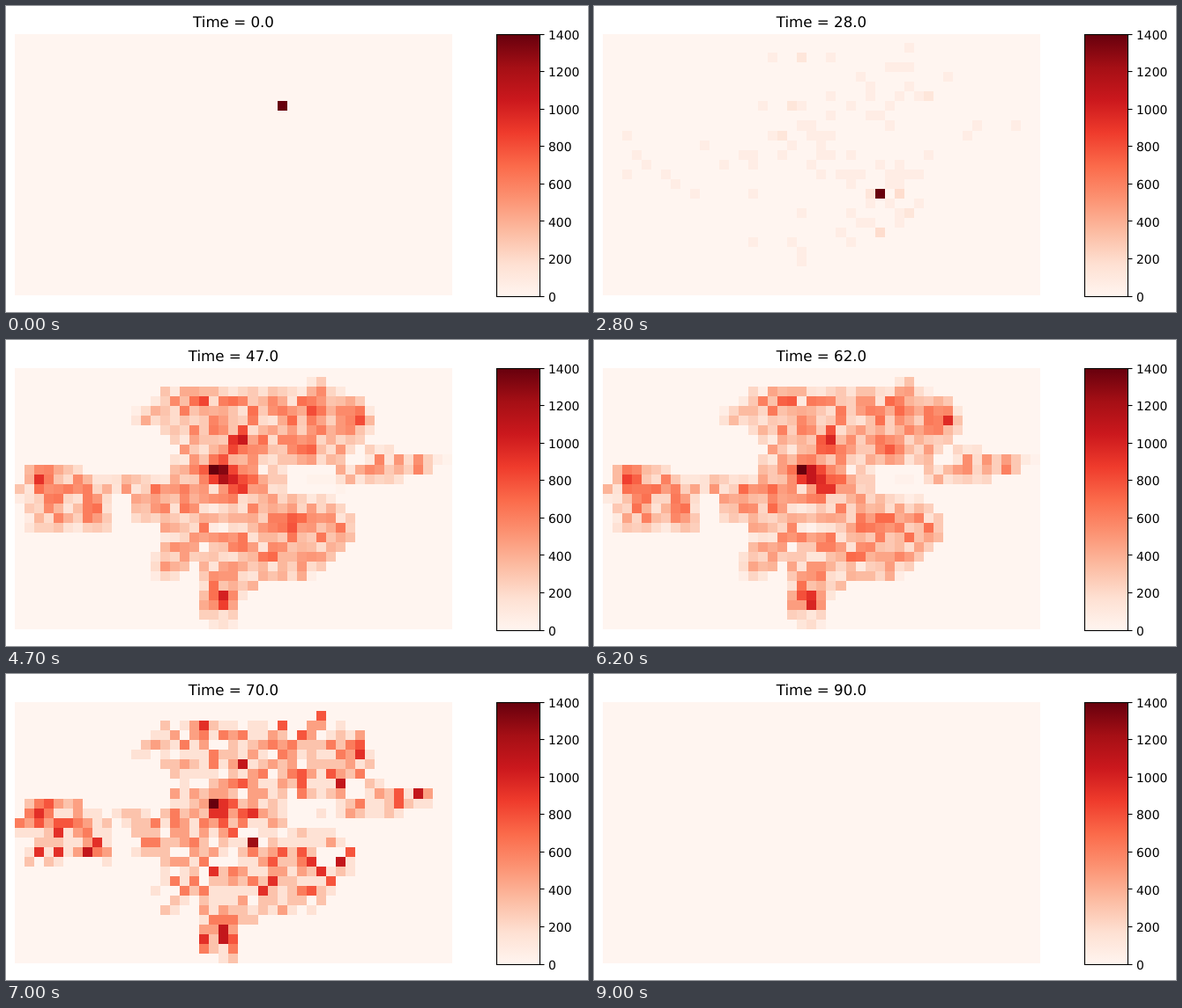
These frames come from a looping animation (660x348 px, 9.1 s). An HTML page with a canvas:

```html
<!DOCTYPE html>
<html lang="en">
<head>
<meta charset="utf-8">
<title>Outbreak heat map</title>
<style>
  html, body { margin: 0; width: 100%; height: 100%; overflow: hidden; background: #fff; }
  canvas, svg { position: absolute; left: 0; top: 0; display: block; }
  text { font-family: "DejaVu Sans", sans-serif; font-size: 13.89px; fill: #000; text-rendering: geometricPrecision; }
  #title { font-size: 16.67px; text-anchor: middle; }
</style>
</head>
<body>
<canvas id="map" width="660" height="348"></canvas>
<svg id="overlay" width="660" height="348" viewBox="0 0 660 348">
  <defs><linearGradient id="reds" x1="0" y1="1" x2="0" y2="0"></linearGradient></defs>
  <text id="title" x="258" y="24"></text>
  <rect x="556.5" y="32.5" width="49" height="298" fill="url(#reds)" stroke="#000" stroke-width="1.1"/>
</svg>
<script>
const COLS = 45, ROWS = 27, CELL = 11.02, STEP = 100, STEPS = 91;
const PEAK = 55, FULL = 1400;
const SVG = 'http://www.w3.org/2000/svg';
const ctx = document.getElementById('map').getContext('2d');
const overlay = document.getElementById('overlay');
const title = document.getElementById('title');

const reds = ['fff5f0', 'fee0d2', 'fcbba1', 'fc9272', 'fb6a4a', 'ef3b2c', 'cb181d', 'a50f15', '67000d']
  .map(h => [0, 2, 4].map(i => parseInt(h.slice(i, i + 2), 16)));

function shade(v) {
  const p = Math.min(1, v) * 8, i = Math.min(7, Math.floor(p));
  return `rgb(${reds[i].map((a, k) => Math.round(a + (reds[i + 1][k] - a) * (p - i)))})`;
}

function add(parent, tag, attrs) {
  const el = document.createElementNS(SVG, tag);
  for (const k in attrs) el.setAttribute(k, attrs[k]);
  return parent.appendChild(el);
}

// Colour bar stops, ticks and labels
const gradient = document.getElementById('reds');
reds.forEach((c, i) => add(gradient, 'stop', { offset: i / 8, 'stop-color': `rgb(${c})` }));
for (let v = 0; v <= FULL; v += 200) {
  const y = 330 - v / FULL * 297.57;
  add(overlay, 'path', { d: `M605.5 ${Math.floor(y) + 0.5}h5`, stroke: '#000', 'stroke-width': 1.1 });
  add(overlay, 'text', { x: 615, y: Math.round(y + 5.52) }).textContent = v;
}

let seed = 7421;
function rand() {
  seed = seed + 0x6D2B79F5 | 0;
  let t = Math.imul(seed ^ seed >>> 15, 1 | seed);
  t = t + Math.imul(t ^ t >>> 7, 61 | t) ^ t;
  return ((t ^ t >>> 14) >>> 0) / 4294967296;
}

// Coastlines in cell units
const land = new Path2D(
  'M30 1H31.5L36.6 3.6 37 6 34 10H28V13H32L35 15 34.5 18 31 22H25L23 24V27H20V26H19V20L21 18H19' +
  'L18 21 16 22H14V19H15V16H12V13H10V17H1V14H0V12H1V10H7V11H16L17 8 15 6H12V4H14L16 2H30Z' +
  'M36 8H39V9H45V10L38 12H30V11L36 10Z');
const onLand = (c, r) => ctx.isPointInPath(land, c + 0.5, r + 0.5);

// Crowded and sparse places: column, row, change of density
const places = [
  [20.5, 10, 1250], [22.5, 11.4, 800], [18, 2.9, 450], [22.7, 7, 450], [30, 4.5, 250], [34, 5, 450],
  [29.5, 8.4, 250], [2, 10.4, 500], [7, 12, 250], [41, 9.5, 250], [28.5, 15.4, 250], [20.3, 23.3, 500],
  [25.5, 10.2, -300], [20.5, 15.4, -300], [31.5, 11.2, -300]
];

function density(c, r) {
  let near = 0;
  for (let y = -1; y <= 1; y++) for (let x = -1; x <= 1; x++) near += onLand(c + x, r + y);
  const base = 370 * (near / 9) ** 1.2 * (0.3 + 1.4 * rand());
  const sum = places.reduce((d, [x, y, v]) => d + v * Math.exp(-((c - x) ** 2 + (r - y) ** 2) / 1.2), base);
  return Math.max(25, sum);
}

// Logistic scatter around a mean time
function around(mean, scale) {
  const u = 0.0005 + 0.999 * rand();
  return mean + scale * Math.log(u / (1 - u));
}

// Each case lasts from one time to another in one cell
const cases = [];
const infect = (c, r, from, to) => cases.push({ cell: r * COLS + c, from, to });

// First case, then a cluster with half of its cases scattered nearby
infect(27, 7, 0, 27);
for (let i = 0; i < 40; i++) {
  const from = 28 - 17 * ((i + 0.3) / 40) ** 1.5;
  const drift = () => i % 2 ? Math.round(6 * (rand() + rand() - 1)) : 0;
  infect(28 + drift(), 16 + drift(), from, from + 24);
}

// Main wave over the whole land
for (let r = 0; r < ROWS; r++) {
  for (let c = 0; c < COLS; c++) {
    if (!onLand(c, r)) continue;
    const people = Math.round(density(c, r) / FULL * PEAK);
    const delay = 0.06 * Math.hypot(c - 22, r - 11);
    for (let i = 0; i < people; i++) {
      infect(c, r, Math.max(20, around(39, 2.5)), Math.min(89, around(65.4 + delay, 2.4)));
    }
  }
}

const left = c => Math.round(10 + c * CELL);
const upper = r => Math.max(32, Math.round(31.3 + r * CELL));

function draw(step) {
  const count = new Uint16Array(COLS * ROWS);
  for (const p of cases) if (p.from <= step && step < p.to) count[p.cell]++;
  const max = Math.max(1, ...count);
  ctx.fillStyle = shade(0);
  ctx.fillRect(10, 32, 496, 297);
  count.forEach((n, i) => {
    if (!n) return;
    const c = i % COLS, r = Math.floor(i / COLS), x = left(c), y = upper(r);
    ctx.fillStyle = shade(n / max);
    ctx.fillRect(x, y, left(c + 1) - x, upper(r + 1) - y);
  });
  title.textContent = `Time = ${step.toFixed(1)}`;
}

const start = performance.now();
let shown = -1;
function tick() {
  const step = Math.floor((performance.now() - start) / STEP) % STEPS;
  if (step !== shown) draw(shown = step);
  requestAnimationFrame(tick);
}
tick();
</script>
</body>
</html>
```
